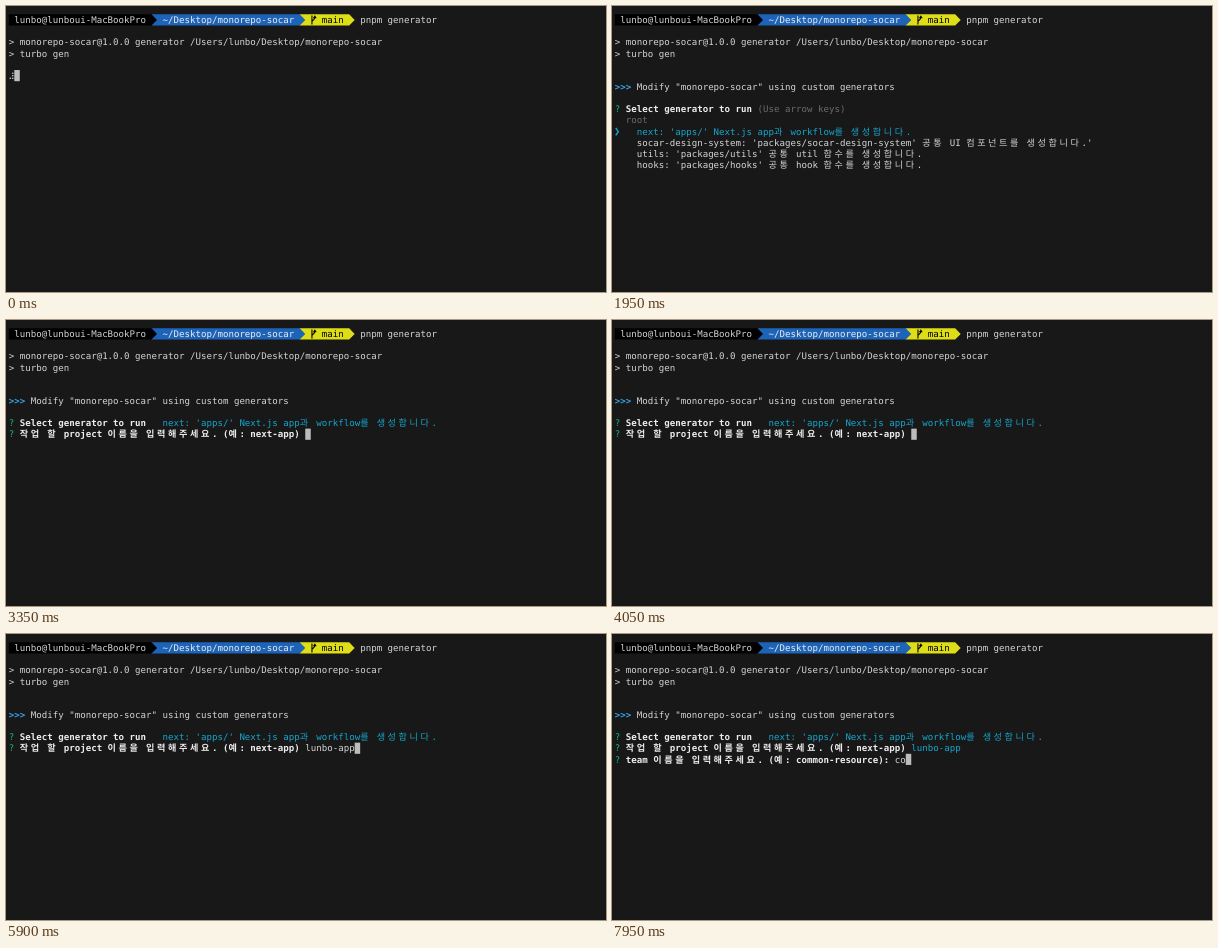
An HTML page that plays this animation: 600 px wide and 286 px high, repeating every 8000 ms.

```html
<!DOCTYPE html>
<html lang="ko">
<head>
<meta charset="utf-8">
<title>Terminal generator</title>
<style>
  html, body { margin: 0; width: 100%; height: 100%; overflow: hidden; background: #181818; }
  svg { display: block; width: 100%; height: 100%; }
  text {
    font: 9.12px "DejaVu Sans Mono", "Noto Sans Mono CJK KR", "Noto Sans CJK KR", "Noto Sans CJK", monospace;
    text-rendering: geometricPrecision;
  }
  .bold { font-weight: 700; }
</style>
</head>
<body>
<svg viewBox="0 0 600 286" preserveAspectRatio="none">
  <rect width="600" height="286" fill="#181818"/>
  <g id="head"></g>
  <g id="body"></g>
</svg>
<script>
const LOOP = 8000, LEFT = 2.8, TOP = 8.3, CELL = 5.49, ROW = 11.15;
const C = {
  fg: '#d4d4d4', white: '#ececec', dim: '#6b6b6b', cyan: '#15a6cc', sky: '#3ba3ea',
  green: '#12b877', blue: '#1d64b8', yellow: '#dede18', black: '#000', cursor: '#bcbcbc'
};
const USER = 'lunbo', PROJECT = USER + '-app', TEAM = 'co';
const MENU_AT = 1300, PROJECT_AT = 3200, TEAM_AT = 6200;
const PROJECT_KEYS = [4450, 4650, 4850, 5050, 5250, 5450, 5650, 5750, 5900];
const TEAM_KEYS = [7750, 7900];
const SPINNER = [...'⠼⠴⠦⠧⠇⠏⠋⠙⠹⠸'];

const colX = col => LEFT + col * CELL;
const rowY = row => TOP + row * ROW;
const cells = ch => /[가-힣]/.test(ch) ? 2 : 1;

// Sets every character on the terminal grid; Hangul takes two cells.
function put(row, col, str, fill = C.fg, bold = false) {
  let out = '', word = '', xs = [];
  const flush = () => {
    if (word) out += `<text x="${xs.join(' ')}" y="${(rowY(row) + 8.8).toFixed(2)}" fill="${fill}"${bold ? ' class="bold"' : ''}>${word}</text>`;
    word = '';
    xs = [];
  };
  for (const ch of str) {
    if (ch === ' ') flush();
    else {
      word += ch === '>' ? '&gt;' : ch;
      xs.push(colX(col).toFixed(2));
    }
    col += cells(ch);
  }
  flush();
  return out;
}

const cursor = (row, col) =>
  `<rect x="${colX(col)}" y="${rowY(row)}" width="${CELL}" height="${ROW}" fill="${C.cursor}"/>`;

function segment(from, to, fill) {
  const x = colX(from), tip = colX(to), y = rowY(0);
  return `<path d="M${x} ${y}H${tip}l${CELL} ${ROW / 2}l${-CELL} ${ROW / 2}H${x}z" fill="${fill}"/>`;
}

function braille(row, ch) {
  const bits = ch.charCodeAt(0) - 0x2800;
  let out = '';
  for (let i = 0; i < 6; i++) {
    if (bits >> i & 1) {
      const x = colX(0) + 1.5 + (i > 2 ? 2.5 : 0), y = rowY(row) + 3.2 + i % 3 * 2.5;
      out += `<circle cx="${x}" cy="${y}" r=".8" fill="${C.fg}"/>`;
    }
  }
  return out;
}

const question = (row, str) => put(row, 0, '?', C.green) + put(row, 2, str, C.white, true);
const NEXT = "next: 'apps/' Next.js app과 workflow를 생성합니다.";

function header() {
  const bx = colX(55);
  return segment(53, 62, C.yellow) + segment(26, 53, C.blue) + segment(0, 26, C.black) +
    put(0, 1, `${USER}@${USER}ui-MacBookPro`) +
    put(0, 28, '~/Desktop/monorepo-socar', C.white) +
    `<path d="M${bx + 1.2} 9.6V18.6M${bx + 1.2} 15.8C${bx + 1.2} 13.9 ${bx + 4.1} 14.6 ${bx + 4.1} 11.2M${bx + 2.7} 12.2L${bx + 4.1} 10.2L${bx + 5.4} 12.2" fill="none" stroke="#000" stroke-width="1.1"/>` +
    put(0, 57, 'main', C.black) +
    put(0, 64, 'pnpm generator') +
    put(2, 0, `> monorepo-socar@1.0.0 generator /Users/${USER}/Desktop/monorepo-socar`) +
    put(3, 0, '> turbo gen');
}

function menu() {
  return put(8, 26, '(Use arrow keys)', C.dim) +
    put(9, 2, 'root', C.dim) +
    `<path d="M${LEFT + 1} ${rowY(10) + 2.2}l2.5 3.7l-2.5 3.7" fill="none" stroke="${C.cyan}" stroke-width="1.4"/>` +
    put(10, 4, NEXT, C.cyan) +
    put(11, 4, "socar-design-system: 'packages/socar-design-system' 공통 UI 컴포넌트를 생성합니다.'") +
    put(12, 4, "utils: 'packages/utils' 공통 util 함수를 생성합니다.") +
    put(13, 4, "hooks: 'packages/hooks' 공통 hook 함수를 생성합니다.");
}

const typed = (str, keys, t) => str.slice(0, keys.filter(k => t >= k).length);
const entry = (row, col, str) => put(row, col, str) + cursor(row, col + str.length);

function session(t) {
  if (t < MENU_AT) return braille(5, SPINNER[Math.floor(t / 80) % SPINNER.length]) + cursor(5, 1);
  let out = put(6, 0, '>>>', C.sky, true) +
    put(6, 4, 'Modify "monorepo-socar" using custom generators') +
    question(8, 'Select generator to run');
  if (t < PROJECT_AT) return out + menu();
  out += put(8, 28, NEXT, C.cyan) + question(9, '작업 할 project 이름을 입력해주세요. (예: next-app)');
  if (t < TEAM_AT) return out + entry(9, 54, typed(PROJECT, PROJECT_KEYS, t));
  return out + put(9, 54, PROJECT, C.cyan) +
    question(10, 'team 이름을 입력해주세요. (예: common-resource):') +
    entry(10, 51, typed(TEAM, TEAM_KEYS, t));
}

const body = document.getElementById('body');
let shown = '';

function draw(t) {
  const next = session(t);
  if (next !== shown) body.innerHTML = shown = next;
}

document.getElementById('head').innerHTML = header();
draw(0);
const start = performance.now();
function tick() {
  draw((performance.now() - start) % LOOP);
  requestAnimationFrame(tick);
}
requestAnimationFrame(tick);
</script>
</body>
</html>
```
